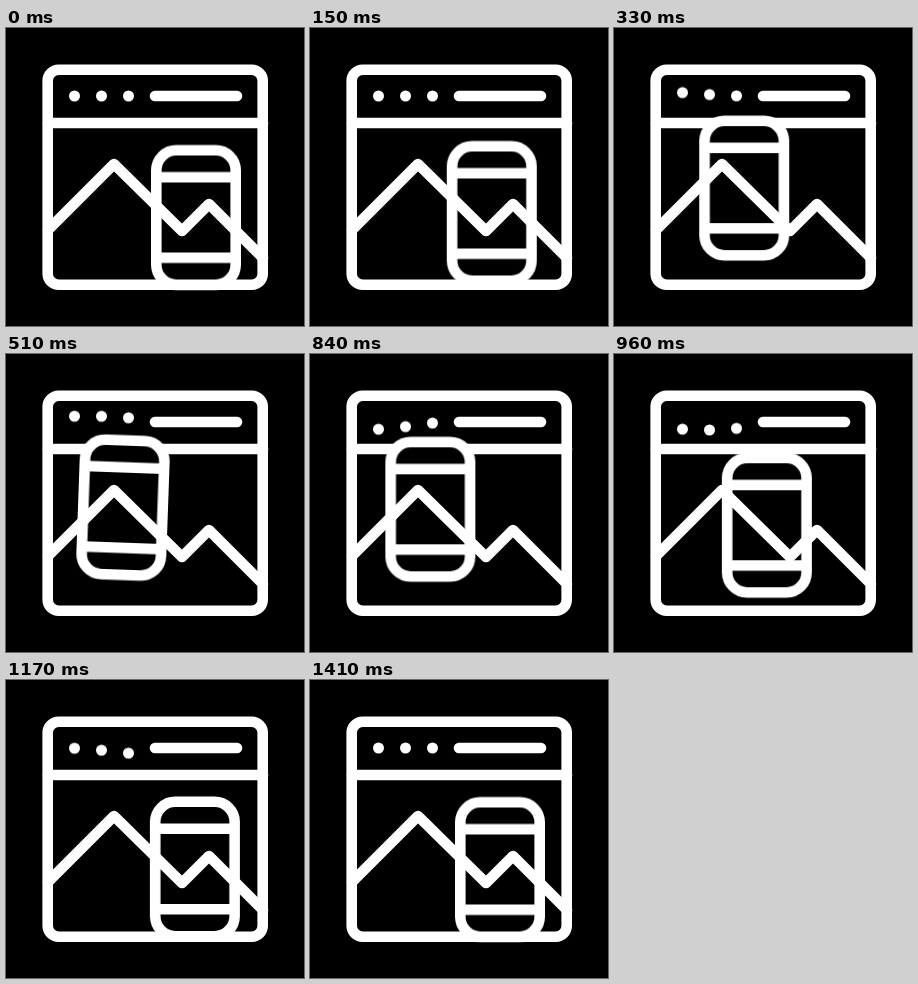
An HTML page that plays this animation: 298x298 px, repeating every 1.44 s.

```html
<!DOCTYPE html>
<html lang="en">
<head>
<meta charset="utf-8">
<title>Responsive layout icon</title>
<style>
  html, body { margin: 0; width: 100%; height: 100%; overflow: hidden; background: #000; }
  svg { display: block; width: 100%; height: 100%; }
  .lines { fill: none; stroke: #fff; stroke-width: 10.6; stroke-linecap: round; stroke-linejoin: round; }
  .screen { fill: #000; }
  .dots { fill: #fff; }

  .slide { animation: slide 1440ms infinite cubic-bezier(.4, 0, .35, 1); }
  .rock { animation: rock 1440ms infinite cubic-bezier(.33, 0, .67, 1); }
  .dots circle { animation: bob 1440ms infinite cubic-bezier(.33, 0, .67, 1); }
  .dots circle:nth-child(2) { animation-delay: 75ms; }
  .dots circle:nth-child(3) { animation-delay: 150ms; }

  @keyframes slide {
    0%, 4.17%, 85.42%, 100% { transform: translate(190px, 189.5px); }
    35.42%, 54.17% { transform: translate(117px, 153.6px); }
  }
  @keyframes rock {
    0%, 31.25%, 54.17%, 100% { transform: rotate(0deg); }
    37.5% { transform: rotate(2.7deg); }
    45.83% { transform: rotate(-2.7deg); }
  }
  @keyframes bob {
    0%, 10.42%, 83.33%, 100% { transform: translateY(0); }
    33.33% { transform: translateY(-6px); }
    62.5% { transform: translateY(8px); }
  }
</style>
</head>
<body>
<svg viewBox="0 0 298 298">
  <g class="lines">
    <rect x="41.7" y="41.8" width="215" height="215" rx="11"/>
    <path d="M42 95H257M149 68H231"/>
    <g class="slide">
      <g class="rock">
        <rect class="screen" x="-39.7" y="-67.2" width="79.4" height="134.4" rx="20"/>
        <path d="M-39.7 -40.3H39.7M-39.7 40.3H39.7"/>
      </g>
    </g>
    <path d="M42 202L108 136L176 203L203 176L257 230"/>
  </g>
  <g class="dots">
    <circle cx="68.5" cy="68" r="5.5"/>
    <circle cx="95.5" cy="68" r="5.5"/>
    <circle cx="122.5" cy="68" r="5.5"/>
  </g>
</svg>
</body>
</html>
```
